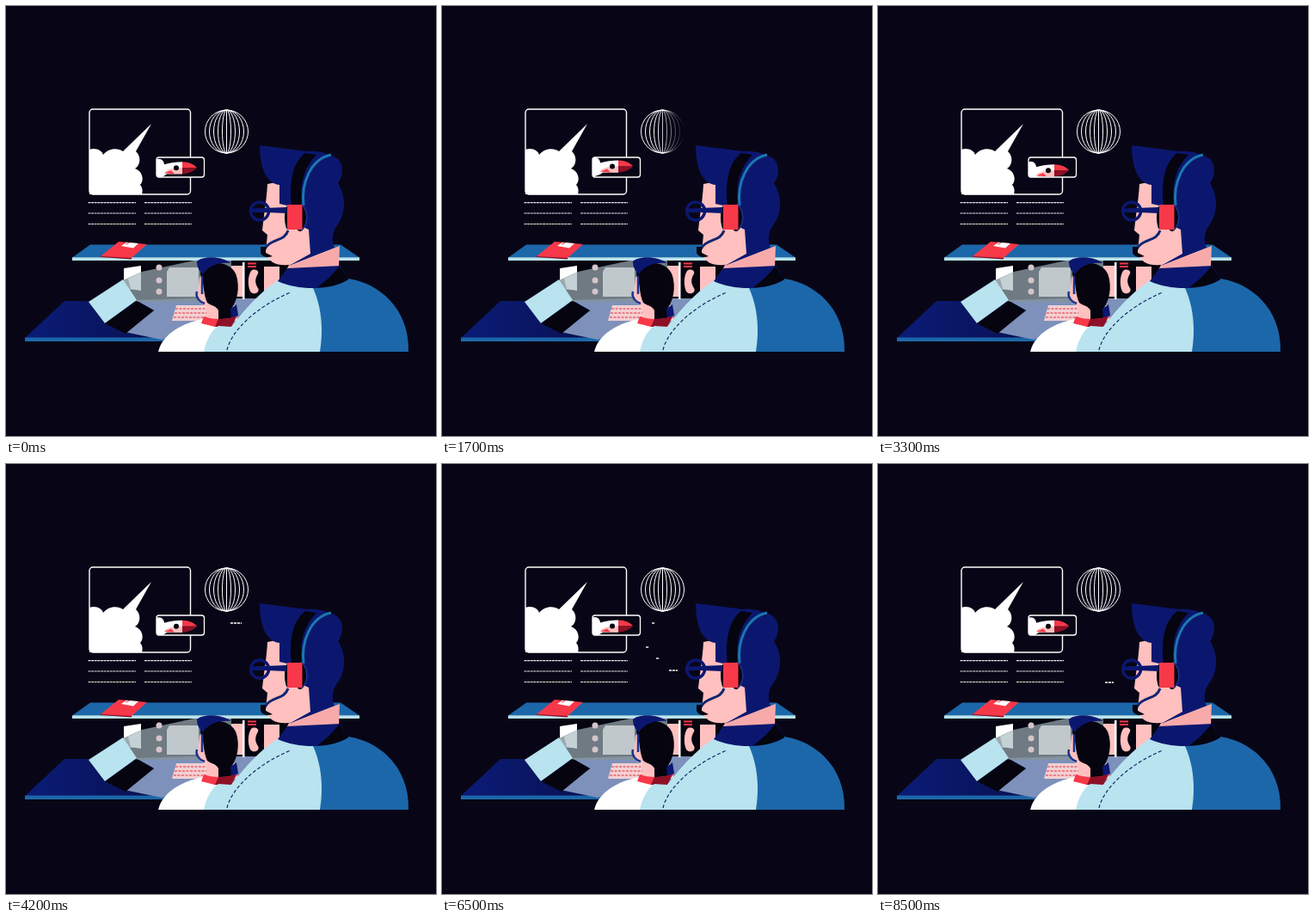
An HTML page for the animation above (8600 ms loop, 500 by 500 pixels).

```html
<!DOCTYPE html>
<html lang="en">
<head>
<meta charset="utf-8">
<title>Mission control</title>
<style>
html, body { margin: 0; width: 100%; height: 100%; overflow: hidden; background: #080616; }
svg { display: block; width: 100vw; height: 100vh; }
.line { fill: none; stroke: #fff; }
.ink { fill: #05040f; }
.navy { fill: #0b176f; }
.blue { fill: #1c67aa; }
.ice { fill: #b8e3ef; }
.skin { fill: #ffc0bf; }
.shade { fill: #f8aaab; }
.red { fill: #f73849; }
.maroon { fill: #8d1026; }
.white { fill: #fff; }
</style>
</head>
<body>
<svg viewBox="0 0 500 500">
  <defs>
    <clipPath id="panelClip"><rect x="175" y="176" width="55" height="23" rx="3"/></clipPath>
    <linearGradient id="deskTone"><stop stop-color="#0b1c78"/><stop offset="1" stop-color="#080d43"/></linearGradient>
    <linearGradient id="globeTone" gradientUnits="userSpaceOnUse" x1="231" x2="281">
      <stop offset=".35" stop-color="#fff"/><stop id="globeEdge" offset="1" stop-color="#fff"/>
    </linearGradient>
  </defs>
  <rect width="500" height="500" fill="#080616"/>

  <g id="screen">
    <path class="white" d="M97 167C104 164 112 168 113 173C118 166 129 164 136 169L169 137L151 169C157 174 157 185 150 189C159 192 161 203 156 208C159 211 159 216 158 219H97Z"/>
    <rect class="line" x="97" y="120" width="117.500" height="99" rx="4" stroke-width="1.4"/>
    <path class="line" stroke-width="1.200" stroke-dasharray="3 .6" opacity=".9"
      d="M95.500 228.700H151M161 228.700H216M95.500 241H151M161 241H216M95.500 253.500H151M161 253.500H216"/>
    <rect x="175" y="176" width="55.500" height="23" rx="3" fill="#080616"/>
    <g clip-path="url(#panelClip)">
      <g id="rocket">
        <path class="white" d="M175 178C180 176 184 180 184 184C190 182 198 181 205 181V195H187C183 199 179 198 175 201Z"/>
        <path class="skin" d="M184 194C187 189 194 188 205 188V195H188Z"/>
        <path class="red" d="M184 194L192 191L196 195Z"/>
        <path class="red" d="M205 181C213 181 219 184 222 188H205Z"/>
        <path class="maroon" d="M205 188H222C218 192 212 195 205 195Z"/>
        <circle class="ink" cx="198" cy="188" r="3"/>
      </g>
    </g>
    <rect class="line" x="175" y="176" width="55.500" height="23" rx="3" stroke-width="1.3"/>
  </g>

  <g id="globe" fill="none" stroke="url(#globeTone)"></g>
  <g id="readout" class="line" stroke-width="1.400" stroke-dasharray="3.200 .8"></g>

  <g id="desk">
    <path d="M68 343H230V388H22V386Z" fill="url(#deskTone)"/>
    <path class="blue" d="M22 385.500H190V390H22Z"/>
    <path class="ink" d="M137 296H330V345H137Z"/>
    <path d="M138 379L172 354L151 342L220 340H320V385H190L181 388Z" fill="#7d91ba"/>
    <path class="white" d="M137 305L157 302V330H137Z"/>
    <path d="M136 319L158 309L223 295H262V344H151Z" fill="#87949d" opacity=".82"/>
    <path d="M142 317L157 310V331L145 329Z" fill="#c5d2d5"/>
    <path d="M190 304H224V338H187V309Z" fill="#c0c8cc"/>
    <g fill="#d5c4c8"><circle cx="178" cy="304" r="3.500"/><circle cx="178" cy="319" r="3.500"/><circle cx="178" cy="332" r="3.500"/></g>
    <path class="ice" d="M96 344L136 318L152 342L115 369Z"/>
    <path class="ink" d="M115 369L152 343L172 354L139 381Z"/>
    <path class="skin" d="M262 302H275V338H262ZM300 303H318V343H300Z"/>
    <path class="white" d="M275 298H277.500V341H275Z"/>
    <path class="red" d="M281 298.500H291V300.500H281ZM281 302H291V304H281Z"/>
    <path class="skin" d="M285 308C290 304 296 309 292 313C289 319 290 323 293 328C296 333 288 337 284 332C281 325 281 314 285 308Z"/>
    <path d="M198 348H266L270 366H193Z" fill="#f4d0d3"/>
    <path d="M197 352H267M196 357H268M195 362H269" fill="none" stroke="#e88089" stroke-width="1.800" stroke-dasharray="3 1.500"/>
    <path class="blue" d="M77 292.500L98 277.500H389L411 292.500Z"/>
    <path class="ice" d="M77 292.300H411V296H77Z"/>
    <path class="maroon" d="M110 290L146 292V294.500L110 292Z"/>
    <path class="red" d="M110 291L131 274L164 277L146 293Z"/>
    <path class="white" d="M134 279L140 274.800L154 276L148 281.500Z"/>
    <path d="M139 277L143 275.500" stroke="#f0343f"/>
  </g>

  <g id="operator">
    <path class="white" d="M177 402C182 381 205 369 229 364L266 372L258 402Z"/>
    <path class="skin" d="M225 315L223 336L227 346L233 349V365H249V320Z"/>
    <path class="ink" d="M226 303C240 294 267 298 269 318C272 334 266 347 262 352V364H247V354C244 348 239 349 234 345C229 334 231 324 226 312Z"/>
    <path class="navy" d="M222 297C230 290 251 291 262 299C248 298 236 301 229 312C223 307 222 301 222 297Z"/>
    <path class="navy" d="M261 352L268 347L270 360L262 364Z"/>
    <path class="red" d="M230 361C240 365 256 365 268 361L262 373H243L227 369Z"/>
    <path class="maroon" d="M247 364C256 364 262 363 268 361L262 373H243Z"/>
    <path d="M222 332C220 339 225 344 231 346M228 314V335" fill="none" stroke="#1b348d" stroke-width="2.500"/>
  </g>

  <g id="director">
    <path class="blue" d="M350 324L398 317C432 322 469 350 468 402H360Z"/>
    <path class="ice" d="M230 402C233 388 239 377 247 372L262 373C275 356 297 330 320 317L356 326C368 350 369 380 365 402Z"/>
    <path d="M257 400C262 378 290 350 331 333" fill="none" stroke="#102765" stroke-width="1.200" stroke-dasharray="4 2.500"/>
    <path class="skin" d="M304 207C303 226 300 242 298 261L304 266L302 286C305 299 316 302 328 301L340 300L354 290V230L319 204Z"/>
    <path class="shade" d="M325 309L329 301L388 279L387 304Z"/>
    <path class="navy" d="M316 320L327 305L389 302L398 318C380 330 342 332 316 320Z"/>
    <path class="ink" d="M362 327C372 320 380 312 388 302L398 318C388 324 374 328 362 327Z"/>
    <path class="navy" d="M295 162L350 169C362 168 372 171 378 174C393 177 394 196 386 206C396 222 396 242 383 258C379 266 379 274 382 281L329 302L354 288L352 260L327 248V232L318 230V208C301 206 295 185 295 162Z"/>
    <path class="ink" d="M348 171C333 182 329 205 332 233H344C341 207 346 189 361 173Z"/>
    <path d="M378 173C354 178 343 206 346 232" fill="none" stroke="#1c78ad" stroke-width="3"/>
    <ellipse class="ink" cx="342" cy="246" rx="7" ry="16"/>
    <path d="M343 230C352 238 352 254 343 261" fill="none" stroke="#1b348d" stroke-width="1.500"/>
    <ellipse class="ink" cx="328" cy="246" rx="4" ry="14"/>
    <rect class="red" x="327" y="231" width="17.500" height="29" rx="1"/>
    <circle cx="295" cy="238.500" r="10.500" fill="none" stroke="#0b176f" stroke-width="3.500"/>
    <path class="navy" d="M286 235.500L326 234V241L302 240L286 240Z"/>
    <path d="M328 261C323 276 306 268 299 287" fill="none" stroke="#12256f" stroke-width="3"/>
    <path class="ink" d="M296 280H302V287L310 291C304 293 298 292 296 287Z"/>
  </g>
</svg>
<script>
const LOOP = 8600, STEP = 100, RADIUS = 25, SPACING = 5;
const byId = id => document.getElementById(id);
const clamp = n => Math.max(0, Math.min(1, n));

function addPath(parent) {
  const path = document.createElementNS('http://www.w3.org/2000/svg', 'path');
  return byId(parent).appendChild(path);
}

for (let x = -RADIUS; x <= RADIUS; x += SPACING) {
  const arc = `M256.5 121A${Math.abs(x)} ${RADIUS} 0 0 ${x > 0 ? 1 : 0} 256.5 171`;
  addPath('globe').setAttribute('d', arc);
}

// Start time, left edge, right edge, row.
const readings = [
  [700, 237, 246, 254], [800, 272.5, 274, 185], [2000, 241, 256, 199],
  [3800, 261, 274, 185], [5200, 263, 267, 213], [6200, 244, 248, 185],
  [6200, 237, 241, 213], [6200, 249, 253, 226], [6100, 264, 274, 240],
  [8100, 264, 274, 254]
].map(reading => ({ reading, path: addPath('readout') }));

function drawReadout(t) {
  for (const { reading: [start, left, right, y], path } of readings) {
    const age = t - start;
    const end = left + (right - left) * clamp((age + STEP) / 300);
    path.setAttribute('d', age >= 0 && age < 600 ? `M${left} ${y}H${end}` : '');
  }
}

function draw(now) {
  const t = Math.floor(now / STEP) * STEP % LOOP;
  const lift = 3 * Math.sin(t / LOOP * 4 * Math.PI);
  byId('rocket').setAttribute('transform', `translate(0 ${.3 - lift})`);
  const dim = clamp((t - 300) / 700) * clamp((3300 - t) / 900);
  byId('globeEdge').setAttribute('stop-opacity', 1 - dim);
  drawReadout(t);
}

let origin;
function tick(now) {
  origin ??= now;
  draw(now - origin);
  requestAnimationFrame(tick);
}
draw(0);
requestAnimationFrame(tick);
</script>
</body>
</html>
```
